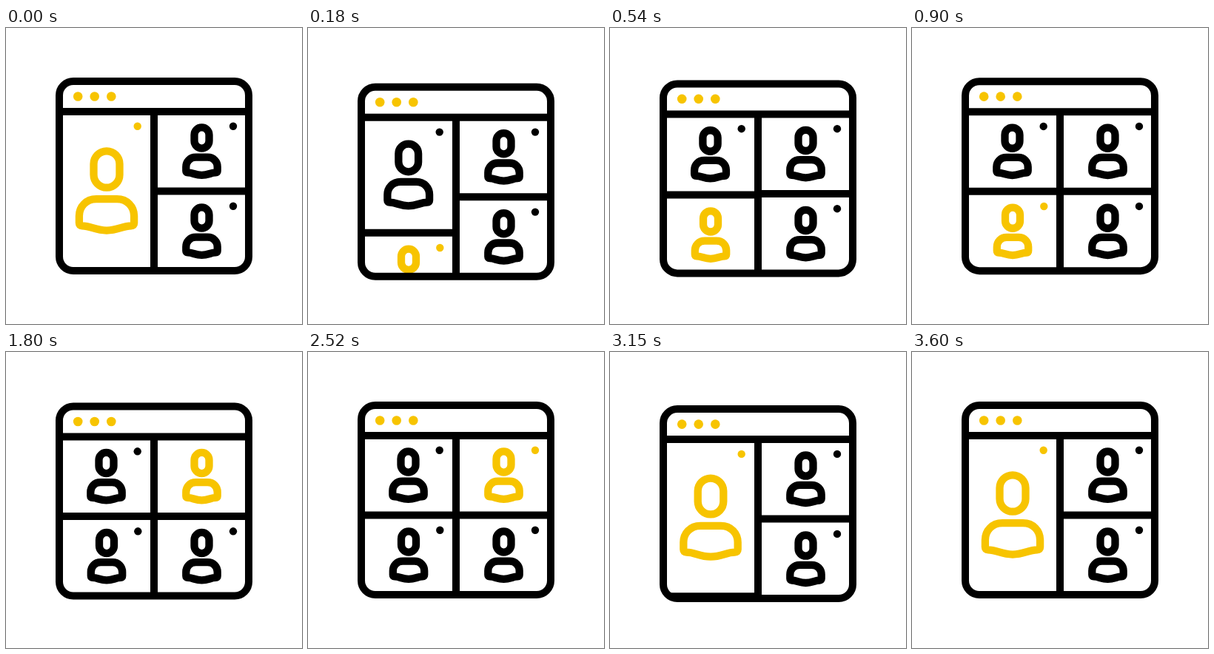
These frames come from a looping animation (400x400 px, 4.13 s). An HTML page with a canvas:

```html
<!DOCTYPE html>
<html lang="en">
<head>
<meta charset="utf-8">
<title>Video call</title>
<style>
html, body { margin: 0; width: 100%; height: 100%; overflow: hidden; background: #fff; }
canvas { display: block; width: 400px; height: 400px; }
</style>
</head>
<body>
<canvas id="stage"></canvas>
<script>
const LOOP = 4130, SPLIT = 30, SWAP = 1620, MERGE = 2700;
const BLACK = '#000', GOLD = '#f7c400', FRAME = 10, LINE = 10.3;

const canvas = document.getElementById('stage');
const ctx = canvas.getContext('2d');
const ratio = window.devicePixelRatio || 1;
canvas.width = canvas.height = 400 * ratio;

const mix = (a, b, k) => a + (b - a) * k;
const within = (t, a, b) => t >= a && t < b;

// Critically damped approach from 0 to 1
function settle(t) {
  const x = Math.max(0, t) / 82;
  return 1 - (1 + x) * Math.exp(-x);
}

// Quick drop with a long return, for the large layout changes
function bump(t) {
  if (t <= 0 || t > 900) return 0;
  const x = t / 246;
  return 11 * Math.pow(x * Math.exp(1 - x), 3.4);
}

// Small nudge when the speaker changes
function nudge(t) {
  return within(t, 0, 540) ? 2 * Math.sin(Math.PI * t / 540) ** 2 : 0;
}

function line(x1, y1, x2, y2) {
  ctx.beginPath();
  ctx.moveTo(x1, y1);
  ctx.lineTo(x2, y2);
  ctx.stroke();
}

function dot(x, y, r, color) {
  ctx.fillStyle = color;
  ctx.beginPath();
  ctx.arc(x, y, r, 0, Math.PI * 2);
  ctx.fill();
}

function box(x, y, w, h, r) {
  ctx.beginPath();
  ctx.moveTo(x + r, y);
  ctx.arcTo(x + w, y, x + w, y + h, r);
  ctx.arcTo(x + w, y + h, x, y + h, r);
  ctx.arcTo(x, y + h, x, y, r);
  ctx.arcTo(x, y, x + w, y, r);
  ctx.closePath();
}

// x, y: centre of the head; big: 0 small, 1 large
function person(x, y, big, color) {
  const k = mix(1, 1.75, big);
  ctx.strokeStyle = color;
  ctx.lineWidth = LINE;
  box(x - 10 * k, y - 14.1 * k, 20 * k, 28.2 * k, 10 * k);
  ctx.stroke();

  const top = y + mix(26.2, 40.2, big);
  const px = u => x + u * k, py = v => top + v * k;
  ctx.beginPath();
  ctx.moveTo(px(-8), py(0));
  ctx.lineTo(px(8), py(0));
  ctx.bezierCurveTo(px(16), py(0), px(21.2), py(6), px(21.2), py(13));
  ctx.lineTo(px(21.2), py(18.5));
  ctx.quadraticCurveTo(px(21.2), py(20.7), px(19), py(20.7));
  ctx.bezierCurveTo(px(12), py(20.7), px(9), py(24.2), px(0), py(24.2));
  ctx.bezierCurveTo(px(-9), py(24.2), px(-12), py(20.7), px(-19), py(20.7));
  ctx.quadraticCurveTo(px(-21.2), py(20.7), px(-21.2), py(18.5));
  ctx.lineTo(px(-21.2), py(13));
  ctx.bezierCurveTo(px(-21.2), py(6), px(-16), py(0), px(-8), py(0));
  ctx.closePath();
  ctx.stroke();
}

function speakerAt(t) {
  if (t < SPLIT || t >= MERGE) return 'main';
  return t < SWAP ? 'lower' : 'right';
}

function draw(t) {
  const big = t < MERGE ? 1 - settle(t - SPLIT) : settle(t - MERGE);
  const shift = bump(t - SPLIT) + nudge(t - SWAP) + bump(t - MERGE);
  const slide = 107.5 * big;
  const speaker = speakerAt(t);
  const tint = name => name === speaker ? GOLD : BLACK;
  const blink = within(t, 540, 720) || within(t, 1140, 1320) ||
                within(t, 1710, 1920) || within(t, 2310, 2520);
  const light = (x, y, name) => {
    if (!(blink && name === speaker)) dot(x, y, 5.2, tint(name));
  };

  ctx.setTransform(ratio, 0, 0, ratio, 0, 0);
  ctx.fillStyle = '#fff';
  ctx.fillRect(0, 0, 400, 400);
  ctx.translate(0, shift);
  ctx.lineJoin = 'round';

  ctx.save();
  box(72, 72, 256, 256, 19);
  ctx.clip();

  person(mix(135.5, 136, big), mix(148.5, 191, big), big, tint('main'));
  light(177.7, 132.8, 'main');
  person(136, 256.5 + slide, 0, tint('lower'));
  light(178.3, 240.8 + slide, 'lower');
  person(264.5, 148.5, 0, tint('right'));
  light(307, 132.8, 'right');
  person(264.5, 256.5, 0, BLACK);
  light(307, 240.8, 'other');

  ctx.strokeStyle = BLACK;
  ctx.lineWidth = FRAME;
  line(72, 220.5 + slide, 200, 220.5 + slide);
  line(200, 220.5, 328, 220.5);
  line(200, 113, 200, 328);
  line(72, 113, 328, 113);
  ctx.restore();

  ctx.strokeStyle = BLACK;
  ctx.lineWidth = FRAME;
  box(72, 72, 256, 256, 19);
  ctx.stroke();
  for (const x of [97.2, 119.7, 142.3]) dot(x, 92.5, 6.3, GOLD);
}

const start = performance.now();
function tick(now) {
  draw(Math.max(0, now - start) % LOOP);
  requestAnimationFrame(tick);
}
draw(0);
requestAnimationFrame(tick);
</script>
</body>
</html>
```
